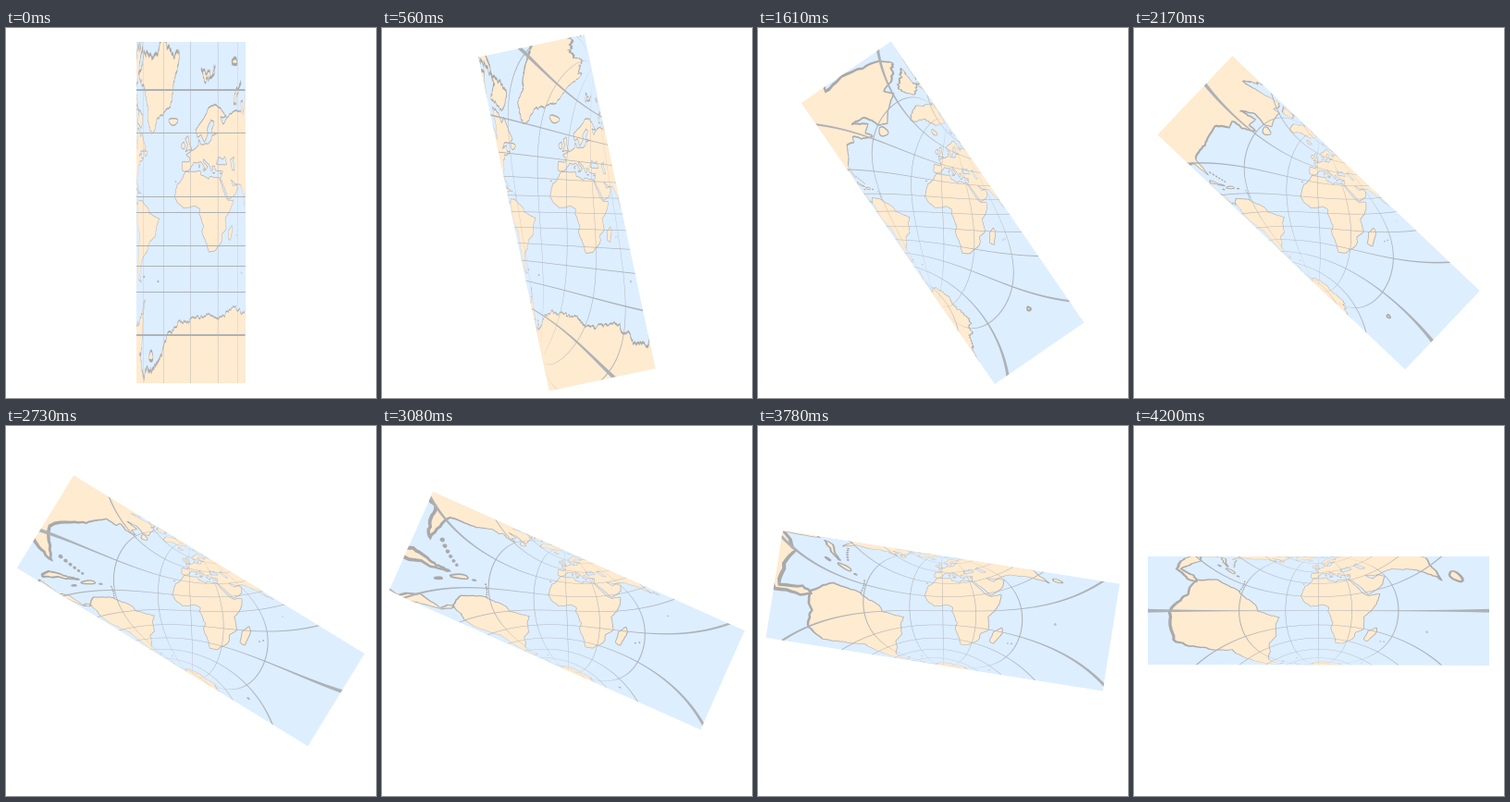
These frames come from a looping animation (400x400 px, 4270 ms). A matplotlib script:

```python
import numpy as np
import matplotlib.pyplot as plt
from matplotlib.animation import FuncAnimation
from matplotlib.collections import PolyCollection
from matplotlib.patches import PathPatch, Rectangle
from matplotlib.path import Path
from matplotlib.transforms import Affine2D

FRAMES, INTERVAL = 61, 70
SIZE, DPI, CENTRE = 400, 100, 199.75
RADIUS, HALF = 58.75, 184.5      # half width and half height of the cylinder
STRETCH = 65.4                   # pixels per unit of Mercator height
OCEAN, LAND, COAST, GRID = "#ddeeff", "#ffebd0", "#a9a9a9", "#adb2b6"

rng = np.random.default_rng(4)

# Corner points as lon, lat pairs; land is cut at 90 W and 90 E.
africa = [
    -6, 36, 10, 37, 11, 33.5, 19, 30.3, 21, 32.7, 32.4, 31.2, 32.6, 29.8,
    37, 21, 39.5, 15.5, 43.3, 11.7, 51.2, 11.8, 48, 4.5, 39.3, -5, 40.7, -15,
    35, -19.9, 35.4, -24, 32.2, -28.8, 27, -33.7, 19.5, -34.8, 18.2, -32,
    11.8, -17.5, 13.6, -12, 8.9, -1, 9.5, 3.7, 4.3, 6.3, -7.6, 4.4, -13, 8.5,
    -17.3, 14.7, -16.2, 19, -14.5, 26, -9.8, 29.8]
eurasia = [
    -6, 36.2, -8.9, 37, -9.2, 43.2, -1.6, 43.4, -1.2, 46, -4.7, 48.2,
    1.6, 50.6, 8.3, 53.8, 8.3, 57, 10.9, 54, 19, 54.6, 23.5, 59.2, 30, 60,
    22, 60.3, 25.3, 65, 22, 65.7, 17.2, 61.5, 18.7, 59.8, 14.5, 55.5,
    10.6, 59.3, 7, 58, 5, 61.5, 13, 66, 19, 70, 27, 71, 41, 67, 33, 66.7,
    37, 64, 46, 68, 60, 68.8, 68, 68.5, 67, 72, 73, 72.5, 73, 67.5, 90, 75.6,
    90, 22, 80.2, 15.5, 77.5, 8.1, 73, 19, 66.6, 25.2, 57, 26, 48, 30,
    51.4, 24.3, 56.3, 26, 59.8, 22.5, 55, 17.4, 43.6, 12.7, 35, 28.8,
    32.6, 29.8, 36, 36.6, 27.5, 36.8, 26.2, 40.3, 23, 40.3, 24, 37.8,
    22.3, 36.6, 19.4, 41.5, 13.2, 45.4, 14, 42.5, 18.3, 40.2, 15.8, 38,
    10.4, 43.4, 3.2, 43, -0.3, 38.8, -2.3, 36.8]
north_america = [
    -90, 69, -82, 69.6, -86, 66.2, -90, 63.5, -90, 57.3, -82.2, 55,
    -80, 51.3, -76.6, 57, -78, 62.4, -70, 61, -67.5, 58.3, -64.5, 60.3,
    -56, 52.3, -60, 50.2, -67, 50, -71, 46.9, -64.4, 49, -64.5, 46,
    -60.5, 46, -66, 43.6, -70.3, 43.6, -70, 41.7, -74, 40.4, -76, 35.3,
    -81.2, 31, -80.3, 25.3, -82.8, 28.5, -84.5, 30, -90, 29.3, -90, 21.1,
    -87, 21.4, -88.7, 15.9, -83.3, 15, -82.5, 9, -79, 9.4, -77, 8, -83, 8.4,
    -87.5, 13, -90, 13.8]
south_america = [
    -77.4, 8.6, -72, 12, -62, 10.6, -51.5, 4, -50, 0, -44, -2.7, -35.2, -5.5,
    -39, -13, -41, -22, -48.6, -26, -53, -34, -62, -39, -67.5, -46, -69, -51,
    -65.2, -54.8, -73, -53.5, -75.5, -49, -73.5, -38, -70.3, -19, -76, -14,
    -81.2, -5.5, -80, 0.5, -77.4, 4]
antarctica = [
    -90, -72.5, -68, -70, -57, -63.3, -62, -70, -62, -75, -70, -79,
    -62, -82.2, -36, -80, -28, -76.3, -11, -71.3, 25, -70, 39, -69.5,
    51, -66, 70, -68.8, 90, -66.7, 90, -90, -90, -90]
greenland = [
    -73, 78.5, -58, 75.3, -51, 69.5, -53, 66, -48, 61, -43.5, 60, -39, 65.5,
    -22, 70.3, -19, 76, -12, 81.5, -33, 83.6, -60, 82]
baffin = [-62, 66.5, -66, 62.2, -78, 64.5, -72, 68, -89, 71, -82, 73.7]
ellesmere = [-90, 76.6, -78, 76.5, -62, 82.4, -90, 81.8]
britain = [-5.5, 50.1, 1.3, 51.2, -1.7, 55.2, -3, 58.6, -6, 57, -3.2, 54]
novaya_zemlya = [52, 71, 57, 71, 56.5, 73, 68, 76.7, 54, 74]
svalbard = [11, 79.5, 16, 76.7, 27, 80]
madagascar = [49.3, -12, 50.3, -15.6, 47.1, -25, 43.6, -24, 44.3, -16.3]
cuba = [-85, 21.9, -82, 23.1, -74.2, 20.2, -78, 20.6]
black_sea = [28, 42, 30.7, 46.5, 36, 45, 39, 47, 41.5, 41.6, 31.5, 41.2]
caspian = [47, 44.7, 53, 46.8, 51.5, 44, 53.8, 37, 49.5, 37.7]

# Round islands: lon, lat and the two half axes.
islands = [
    (-8, 53.4, 1.8, 1.9), (-18.8, 65, 5, 1.4), (14.2, 37.5, 1.4, .6),
    (9, 40.3, .6, 1.2), (25, 35.2, 1.2, .25), (33.2, 35, .9, .3),
    (80.8, 7.6, .9, 1.7), (69.6, -49.4, .8, .4), (-59.3, -51.7, 1.4, .4),
    (-37, -54.4, .9, .3), (54, 80.6, 5, .5), (-47, -79.3, 3, .9),
    (-56, 49, 2.7, 1.6), (-71.3, 18.9, 2.8, .7), (-77.3, 18.1, .9, .2),
    (-66.4, 18.2, .7, .2), (55.5, -21.1, .2, .2), (57.6, -20.3, .2, .2),
    (72.4, -7.3, .1, .1), (-16, 28.3, .6, .2)]


def outline(flat, rough=.09):
    """Closed lon/lat ring, refined by random midpoint displacement."""
    ring = np.reshape(flat + flat[:2], (-1, 2)).astype(float)
    while True:
        a, b = ring[:-1], ring[1:]
        d = b - a
        length = np.maximum(np.hypot(d[:, 0], d[:, 1]), 1e-9)
        long = length > 1
        if not long.any():
            return np.clip(ring, -90, 90)
        push = rng.normal(0, rough, len(d)) / np.sqrt(length)
        push[((abs(a) == 90) & (abs(b) == 90)).any(axis=1)] = 0
        mid = (a + b) / 2 + push[:, None] * np.column_stack([-d[:, 1], d[:, 0]])
        ring = np.insert(ring, np.flatnonzero(long) + 1, mid[long], axis=0)


def ellipse(lon, lat, rx, ry):
    a = np.linspace(0, 2 * np.pi, 17)
    wobble = 1 + .12 * np.sin(3 * a + lon)
    return np.column_stack([lon + rx * wobble * np.cos(a),
                            lat + ry * wobble * np.sin(a)])


def ribbon(line, width):
    """Turn a lon/lat line into a band of constant width in degrees."""
    d = np.gradient(line, axis=0)
    d /= np.maximum(np.hypot(d[:, 0], d[:, 1]), 1e-9)[:, None]
    side = np.column_stack([-d[:, 1], d[:, 0]]) * width / 2
    return np.vstack([line + side, (line - side)[::-1]])


class Layer:
    """Spherical polygons projected on the tilted cylinder."""

    def __init__(self, shapes, color, z):
        lon, lat = np.radians(np.clip(np.vstack(shapes), -90, 90)).T
        self.y, self.z = np.cos(lat) * np.sin(lon), np.sin(lat)
        self.cuts = np.cumsum([len(s) for s in shapes])[:-1]
        self.art = PolyCollection([], facecolor=color, edgecolor="none",
                                  linewidth=0, zorder=z)
        self.art.set_transform(spin + ax.transData)
        ax.add_collection(self.art, autolim=False)

    def tilt(self, angle):
        c, s = np.cos(angle), np.sin(angle)
        across = self.y * c + self.z * s
        along = np.clip(self.z * c - self.y * s, -.9999, .9999)
        u = np.clip(across / np.sqrt(1 - along ** 2), -1, 1)
        uv = np.column_stack([RADIUS * u, STRETCH * np.arctanh(along)])
        self.art.set_verts(np.split(uv, self.cuts))


fig = plt.figure(figsize=(SIZE / DPI, SIZE / DPI), dpi=DPI, facecolor="white")
ax = fig.add_axes([0, 0, 1, 1])
ax.set_xlim(-CENTRE, SIZE - CENTRE)
ax.set_ylim(CENTRE - SIZE, CENTRE)
ax.axis("off")
spin = Affine2D()

smooth = [africa, eurasia, north_america, south_america, britain,
          madagascar, cuba]
ragged = [greenland, baffin, ellesmere, antarctica, novaya_zemlya, svalbard]
land = [outline(s) for s in smooth] + [outline(s, .2) for s in ragged]
land += [ellipse(*i) for i in islands]
# Two island chains: the Bahamas and the Lesser Antilles
for t in np.linspace(0, 1, 6):
    land.append(ellipse(-78.3 + 5.5 * t, 26.4 - 4.2 * t, .25, .2))
    land.append(ellipse(-61.5 + .6 * np.sin(3 * t), 10.4 + 6.5 * t, .18, .2))
water = [outline(s, .06) for s in (black_sea, caspian)]

span = np.linspace(-90, 90, 181)
parallels = [np.column_stack([span, np.full(181, t)])
             for t in range(-75, 90, 15)]
meridians = [np.column_stack([np.full(181, t), span])
             for t in range(-60, 90, 30)]

layers = [
    Layer(land, LAND, 2),
    Layer(water, OCEAN, 3),
    Layer([ribbon(r, .5) for r in land + water], COAST, 4),
    Layer([ribbon(g, .45) for g in parallels + meridians], GRID, 5),
]


def box(w, h):
    return [(-w, -h), (w, -h), (w, h), (-w, h), (-w, -h)]


sheet = Rectangle((-RADIUS, -HALF), 2 * RADIUS, 2 * HALF, facecolor=OCEAN,
                  linewidth=0, zorder=1)
ring_codes = [Path.MOVETO] + [Path.LINETO] * 3 + [Path.CLOSEPOLY]
mask = PathPatch(Path(box(400, 400) + box(RADIUS, HALF)[::-1], ring_codes * 2),
                 facecolor="white", linewidth=0, zorder=6)
for patch in (sheet, mask):
    patch.set_transform(spin + ax.transData)
    ax.add_artist(patch)


def update(i):
    angle = np.pi / 2 * i / (FRAMES - 1)
    spin.clear().rotate(angle)
    for layer in layers:
        layer.tilt(angle)
    return []


anim = FuncAnimation(fig, update, frames=FRAMES, interval=INTERVAL,
                     repeat=True, repeat_delay=0, blit=False)
plt.show()
```
